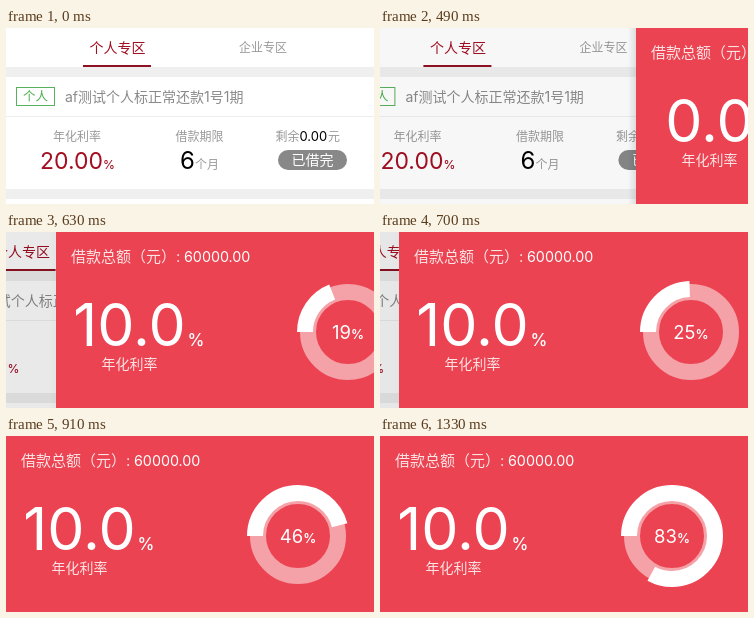
These frames come from a looping animation (368 px wide and 176 px high, 1890 ms). An HTML page:

```html
<!DOCTYPE html>
<html lang="zh-CN">
<head>
<meta charset="utf-8">
<title>个人专区</title>
<style>
  html, body { margin: 0; width: 100%; height: 100%; overflow: hidden; background: #fff; }
  svg { display: block; width: 368px; height: 176px; }
  text { font-family: Inter, "Noto Sans CJK SC", "Noto Sans CJK", sans-serif; white-space: pre; }
  .grey { fill: #999; }
  .red { fill: #a30f22; }
  .white { fill: #fff; }
  .soft { fill: #fde3e5; }
  .mid { text-anchor: middle; }
  .s12 { font-size: 12px; }
  .s14 { font-size: 14px; }
  .s15 { font-size: 15px; }
  .num { font-size: 23px; }
  .rate { font-size: 59px; }
  .ring { fill: none; stroke-width: 16; }
</style>
</head>
<body>
<svg viewBox="0 0 368 176">
  <defs>
    <linearGradient id="shade">
      <stop offset="0" stop-color="#000" stop-opacity="0"/>
      <stop offset="1" stop-color="#000" stop-opacity=".15"/>
    </linearGradient>
  </defs>

  <g id="list">
    <rect width="368" height="176" fill="#fff"/>
    <text class="red s14" x="83.5" y="24.7">个人专区</text>
    <text class="grey s12" x="233" y="24">企业专区</text>
    <path d="M0 39h368v10H0zM0 161h368v10H0z" fill="#efefef"/>
    <rect x="77" y="37" width="68" height="2" fill="#8f1022"/>
    <rect x="10.5" y="59.5" width="38" height="18" fill="none" stroke="#58b15c"/>
    <text x="17" y="73" font-size="12.5" fill="#4caf50">个人</text>
    <text class="s14" x="59" y="74" fill="#8a8a8a">af测试个人标正常还款1号1期</text>
    <rect y="88" width="368" height="1" fill="#eee"/>
    <g class="grey s12">
      <text x="47" y="112.5">年化利率</text>
      <text x="169.5" y="112.5">借款期限</text>
      <text x="269.5" y="112.5">剩余</text>
      <text x="322" y="112.5">元</text>
      <text x="189" y="140.5">个月</text>
    </g>
    <text x="293.5" y="112.5" font-size="13">0.00</text>
    <text class="red num" x="34" y="141">20.00</text>
    <text class="red s12" x="97" y="141" font-weight="500">%</text>
    <text x="174" y="141" font-size="24">6</text>
    <rect x="272" y="122" width="69" height="20" rx="10" fill="#888"/>
    <text class="white s14 mid" x="306.5" y="137.2">已借完</text>
  </g>
  <rect id="dim" width="368" height="176"/>

  <g id="detail">
    <rect id="shadow" x="-8" width="8" height="176" fill="url(#shade)"/>
    <rect width="368" height="176" fill="#eb4351"/>
    <g class="white">
      <text class="soft s15" x="15" y="29.7">借款总额（元）: </text>
      <text x="128" y="29.7" font-size="14.3">60000.00</text>
      <text id="rate" class="rate mid" x="73.5" y="114"></text>
      <text x="131.5" y="114" font-size="17" font-weight="500">%</text>
      <text class="soft s14 mid" x="73.5" y="137.2">年化利率</text>
      <text class="mid" x="292" y="107" font-size="18.5"><tspan id="count"></tspan><tspan font-size="13" font-weight="600">%</tspan></text>
    </g>
    <circle class="ring" cx="292" cy="100" r="40" stroke="#f5a1a8"/>
    <circle id="arc" class="ring" cx="292" cy="100" r="43" stroke="#fff" pathLength="100" transform="rotate(180 292 100)"/>
  </g>
</svg>
<script>
  const LOOP = 1890, STEP = 70, WIDTH = 368;
  const PUSH_START = 425, PUSH_RATE = 0.0171;
  const el = id => document.getElementById(id);
  const [list, dim, detail, shadow, rate, count, arc] =
    ["list", "dim", "detail", "shadow", "rate", "count", "arc"].map(el);

  // Ring fill in percent: [ms, value]
  const fill = [[490, 0], [630, 19], [770, 30], [910, 46], [1050, 63], [1190, 75], [1330, 83]];

  function valueAt(track, t) {
    const i = track.findIndex(p => p[0] > t);
    if (i < 0) return track[track.length - 1][1];
    if (i === 0) return track[0][1];
    const [t0, v0] = track[i - 1], [t1, v1] = track[i];
    return v0 + (v1 - v0) * (t - t0) / (t1 - t0);
  }

  // Critically damped spring: remaining share of the push.
  function remaining(t) {
    const u = Math.max(0, t - PUSH_START) * PUSH_RATE;
    return (1 + u) * Math.exp(-u);
  }

  function draw(t) {
    const left = t > 900 ? 0 : Math.round(WIDTH * remaining(t));
    const moved = WIDTH - left;
    const percent = valueAt(fill, t);
    detail.setAttribute("transform", `translate(${left})`);
    detail.setAttribute("visibility", moved ? "visible" : "hidden");
    shadow.setAttribute("opacity", left / WIDTH);
    list.setAttribute("transform", `translate(${-0.3 * moved})`);
    dim.setAttribute("opacity", 0.1 * moved / WIDTH);
    rate.textContent = t < 560 ? "0.0" : "10.0";
    count.textContent = Math.round(percent);
    arc.setAttribute("stroke-dasharray", `${percent} 200`);
  }

  const start = performance.now();
  function tick() {
    const t = (performance.now() - start) % LOOP;
    draw(Math.floor(t / STEP) * STEP);
    requestAnimationFrame(tick);
  }
  tick();
</script>
</body>
</html>
```
